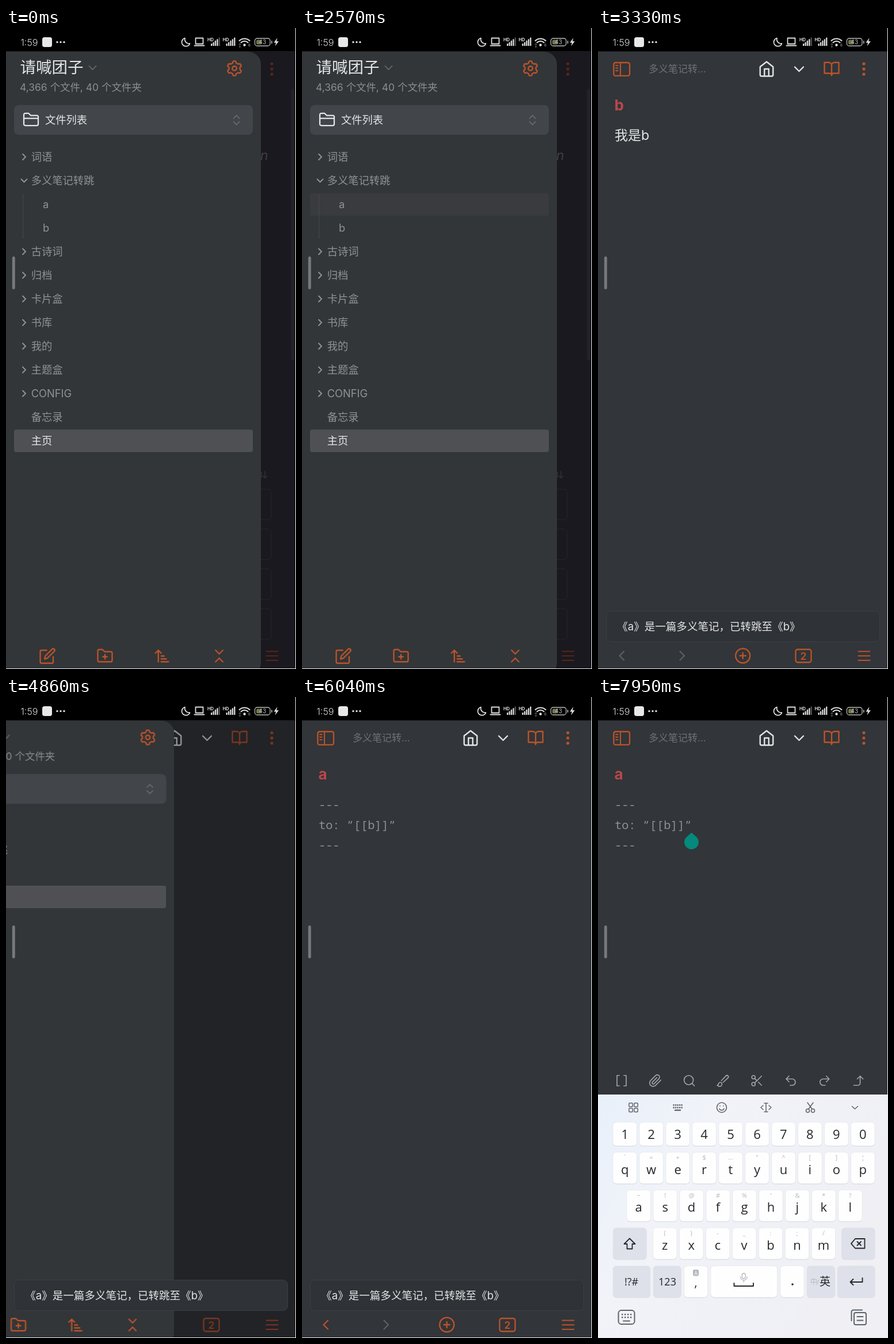
An HTML page that plays this animation: 504 px wide and 1111 px high, repeating every 8000 ms.

```html
<!DOCTYPE html>
<html lang="zh">
<head>
<meta charset="utf-8">
<title>笔记转跳</title>
<style>
html, body { margin: 0; width: 100%; height: 100%; overflow: hidden; background: #323539; }
svg { display: block; width: 100vw; height: 100vh; font-family: Inter, "Noto Sans CJK SC", "Noto Sans CJK", sans-serif; }
text { white-space: pre; }
.mono { font-family: "Noto Sans Mono", "DejaVu Sans Mono", monospace; }
.key { font-family: "Open Sans", "Noto Sans CJK SC", "Noto Sans CJK", sans-serif; text-anchor: middle; }
.mid { text-anchor: middle; }
</style>
</head>
<body>
<svg id="stage" viewBox="0 0 504 1111" preserveAspectRatio="none"></svg>
<script>
const LOOP = 8000;
const ORANGE = '#bb532a', WHITE = '#e4e5e6', GREY = '#909295', DIM = '#5d6064', PAGE = '#323539';

const box = (x, y, w, h, r, fill, more = '') =>
  `<rect x="${x}" y="${y}" width="${w}" height="${h}" rx="${r}" fill="${fill}" ${more}/>`;
const text = (x, y, size, str, fill, more = '') =>
  `<text x="${x}" y="${y}" font-size="${size}" fill="${fill}" ${more}>${str}</text>`;
const dot = (x, y, r, fill) => `<circle cx="${x}" cy="${y}" r="${r}" fill="${fill}"/>`;
const line = (d, color, w = 2, more = '') =>
  `<path d="${d}" fill="none" stroke="${color}" stroke-width="${w}" stroke-linecap="round" stroke-linejoin="round" ${more}/>`;
const icon = (cx, cy, size, d, color, w = 1.9) =>
  line(d, color, w, `transform="translate(${cx - size / 2} ${cy - size / 2}) scale(${size / 24})"`);
const group = (id, body) => `<g id="${id}">${body}</g>`;

const ring = (x, y, r) => `M${x + r} ${y}a${r} ${r} 0 1 1 ${-2 * r} 0 ${r} ${r} 0 0 1 ${2 * r} 0`;

function gearPath() {
  let d = '';
  for (let i = 0; i < 72; i++) {
    const a = i * Math.PI / 36;
    const r = 8.8 + Math.max(-1.1, Math.min(1.3, 2.4 * Math.cos(6 * a)));
    d += `${i ? 'L' : 'M'}${(12 + r * Math.sin(a)).toFixed(2)} ${(12 - r * Math.cos(a)).toFixed(2)}`;
  }
  return d + 'z' + ring(12, 12, 3);
}

const FOLDER = 'M4 20a2 2 0 0 1-2-2V5a2 2 0 0 1 2-2h4.5l3 3H20a2 2 0 0 1 2 2v10a2 2 0 0 1-2 2z';
const ICONS = {
  gear: gearPath(),
  edit: 'M11 4H4a2 2 0 0 0-2 2v14a2 2 0 0 0 2 2h14a2 2 0 0 0 2-2v-7M18.5 2.5a2.12 2.12 0 0 1 3 3L12 15l-4 1 1-4z',
  folder: FOLDER + 'M2 10h20',
  folderPlus: FOLDER + 'M12 10v6M9 13h6',
  sort: 'M3 8l4-4 4 4M7 4v16M11 12h4M11 16h7M11 20h10',
  collapse: 'M7 20l5-5 5 5M7 4l5 5 5-5',
  home: 'M3 9l9-7 9 7v11a2 2 0 0 1-2 2H5a2 2 0 0 1-2-2zM9 22V12h6v10',
  book: 'M2 3h6a4 4 0 0 1 4 4v14a3 3 0 0 0-3-3H2zM22 3h-6a4 4 0 0 0-4 4v14a3 3 0 0 1 3-3h7z',
  plus: ring(12, 12, 10) + 'M8 12h8M12 8v8',
  brackets: 'M8 3H4v18h4M16 3h4v18h-4',
  clip: 'M21.4 11l-9.2 9.2a6 6 0 0 1-8.5-8.5l8.6-8.6a4 4 0 1 1 5.7 5.7l-8.6 8.6a2 2 0 0 1-2.8-2.8l8-8',
  search: ring(11, 11, 8) + 'M21 21l-4.3-4.3',
  brush: 'M9 12l8-8.4a2.4 2.4 0 0 1 3.5 3.5L12 15M7 15c-1.7 0-3 1.3-3 3 0 1.3-2.5 1.5-2 2 1.1 1 2.5 2 4 2 2.2 0 4-1.8 4-4a3 3 0 0 0-3-3z',
  scissors: ring(6, 6, 3) + ring(6, 18, 3) + 'M20 4L8.1 15.9M14.5 14.5L20 20M8.1 8.1L12 12',
  undo: 'M9 14L4 9l5-5M4 9h10.5a5.5 5.5 0 0 1 0 11H11',
  redo: 'M15 14l5-5-5-5M20 9H9.5a5.5 5.5 0 0 0 0 11H13',
  up: 'M10 9l5-5 5 5M4 20h7a4 4 0 0 0 4-4V4'
};

function statusBar() {
  let s = box(0, 0, 504, 40.5, 0, '#000');
  s += text(25.5, 30.5, 16.2, '1:59', '#d8d8d8', 'font-weight="300"');
  s += box(63, 16, 17, 17, 4, '#e8e8e8');
  for (const x of [89, 95, 101]) s += dot(x, 24.5, 1.7, '#ddd');
  s += line('M311 17.5a7.2 7.2 0 1 0 8.5 9.5a7.5 7.5 0 0 1-8.5-9.5z', '#ddd', 1.8);
  s += line('M329.5 17.5h13v10h-13zM327.5 30.5h17', '#ddd', 1.8);
  for (const x of [350, 376.5]) {
    s += text(x, 23, 7.5, 'HD', '#ddd', 'font-weight="700"');
    for (let i = 0; i < 5; i++) {
      const h = 4 + i * 2.6;
      s += box(x + 6 + i * 3.4, 31 - h, 2.3, h, 0.6, x < 360 && i === 4 ? '#555' : '#ddd');
    }
  }
  s += line('M405.5 22a13 13 0 0 1 18 0M408.5 25.3a8.6 8.6 0 0 1 12 0', '#ddd', 2);
  s += dot(414.5, 29.5, 2.2, '#ddd') + text(421, 32, 6.5, '6', '#aaa') + text(404, 32, 6, '↕', '#aaa');
  s += box(432.5, 18, 26.5, 13, 4, 'none', 'stroke="#bbb" stroke-width="1.3"') + box(461, 22, 1.6, 5, 0.8, '#bbb');
  s += box(435, 20.5, 9, 8, 2, '#71784c') + text(445.8, 28.3, 10, '43', '#bbb', 'class="mid"');
  return s + '<path d="M471.5 17l-6 8.4h3.6l-1.4 6.2 6.2-8.6h-3.7z" fill="#ddd"/>';
}

function homePage() {
  let s = text(442, 229, 23, 'n', '#86888b', 'font-style="italic"');
  s += line('M444 770v9M450 768v12m-3.5-3.5l3.5 3.5 3.5-3.5', '#66696d', 1.5);
  for (let i = 0; i < 4; i++) s += box(14, 799.5 + i * 69, 447, 53, 6, 'none', 'stroke="#4a4d52"');
  return s + box(495, 106, 6, 470, 3, '#45484d');
}

function chrome() {
  let s = box(27.3, 60, 27.7, 22.8, 3, 'none', `stroke="${ORANGE}" stroke-width="2.3"`);
  s += line('M39 60v22.5M31 65h3.5M31 69.5h3.5M31 74h3.5', ORANGE, 2);
  s += text(88, 77, 17, '多义笔记转...', '#6f7275');
  s += icon(293, 71, 30, ICONS.home, WHITE) + line('M342 67.5l7.5 7.5 7.5-7.5', WHITE, 2.3);
  s += icon(406, 71, 30, ICONS.book, ORANGE);
  for (const y of [62, 71, 80]) s += dot(462, y, 2.6, ORANGE);
  s += line('M45 1080.5l-7.5 7.5 7.5 7.5', DIM, 2.2, 'id="back"');
  s += line('M142.5 1080.5l7.5 7.5-7.5 7.5', DIM, 2.2);
  s += icon(251.7, 1088, 30, ICONS.plus, ORANGE);
  s += box(343.5, 1077, 27, 22.5, 3.5, 'none', `stroke="${ORANGE}" stroke-width="2.3"`);
  s += text(357, 1094.5, 17.5, '2', ORANGE, 'class="mid" font-weight="600"');
  return s + line('M452.5 1080.5h20M452.5 1088.2h20M452.5 1096h20', ORANGE, 2.1);
}

const title = s => text(28.5, 143, 26, s, '#b9484a', 'font-weight="700"');
const pageA = () => title('a') + ['---', 'to: ”[[b]]”', '---']
  .map((s, i) => text(29, 194 + 35 * i, 20.3, s, '#8d8f91', 'class="mono"')).join('');
const pageB = () => title('b') + text(28.7, 193.7, 23.2, '我是b', WHITE);

const ROWS = ['词语', '多义笔记转跳', 'a', 'b', '古诗词', '归档', '卡片盒', '书库', '我的', '主题盒', 'CONFIG', '备忘录', '主页'];
const rowY = i => 223.5 + 41 * i;

function drawer() {
  let s = `<path d="M0 41H421a22 22 0 0 1 22 22V1100a22 22 0 0 1-22 22H0z" fill="#323639"/>`;
  s += text(24.5, 77.5, 27.5, '请喊团子', WHITE) + line('M144.5 66l6 6 6-6', DIM, 2);
  s += text(24, 108.5, 17.45, '4,366 个文件, 40 个文件夹', '#8c8e91');
  s += icon(397, 70, 30, ICONS.gear, ORANGE);
  s += box(14, 133.5, 415, 51.5, 8, '#424549') + icon(43.5, 159, 30, ICONS.folder, WHITE, 1.8);
  s += text(68, 165.5, 18.3, '文件列表', WHITE);
  s += line('M395.5 156.5l5-5 5 5M395.5 162.5l5 5 5-5', '#6b6e72', 1.7);
  s += box(14, 286.5, 415, 39, 4, '#393b3f', 'id="press"');
  s += box(29, 288, 1.2, 77, 0, '#43474b');
  s += box(14, rowY(0) - 19.5, 415, 39, 4, '#4e5054', 'id="active"');
  ROWS.forEach((name, i) => {
    const y = rowY(i), leaf = i === 2 || i === 3;
    if (i === 1) s += line(`M26.5 ${y - 2.5}l5 5 5-5`, GREY, 2);
    else if (!leaf && i < 11) s += line(`M29 ${y - 5}l5 5-5 5`, GREY, 2);
    s += text(leaf ? 64 : 43.7, y + 6.7, 18.3, name, GREY, `id="row${i}"`);
  });
  [['edit', 72], ['folderPlus', 172], ['sort', 271], ['collapse', 370.5]]
    .forEach(([name, x]) => s += icon(x, 1088.5, 30, ICONS[name], ORANGE));
  return s;
}

function toolbar() {
  let s = box(0, 641, 504, 48, 0, PAGE);
  ['brackets', 'clip', 'search', 'brush', 'scissors', 'undo', 'redo', 'up']
    .forEach((name, i) => s += icon(41 + i * 58.8, 665, 24, ICONS[name], '#a2a4a6', 1.7));
  return s;
}

function keyboard() {
  const INK = '#24262a', SOFT = '#5f636b', HINT = '#b4b7be', MOD = '#dee1ea';
  let s = box(0, 689, 504, 422, 0, 'url(#kb)');
  const cap = (x, y, w, h, fill = '#fefefe') =>
    box(x, y + 1, w, h, 6, '#d6d8e0') + box(x, y, w, h, 6, fill, 'stroke="#e2e4ea" stroke-width=".6"');
  const glyph = (x, y, size, str, fill = INK) => text(x, y, size, str, fill, 'class="key"');
  const row = (keys, hints, x0, y) => [...keys].forEach((k, i) => {
    const x = x0 + i * 45.95, hint = hints[i].replace('&', '&amp;');
    s += cap(x, y, 41.5, 54.5) + glyph(x + 20.7, y + 37.5, 22, k) + glyph(x + 20.7, y + 13, 11, hint, HINT);
  });
  // top strip
  for (const x of [57, 66]) for (const y of [707, 716])
    s += box(x - 3.2, y - 3.2, 6.4, 6.4, 1.5, 'none', `stroke="${SOFT}" stroke-width="1.5"`);
  for (let i = 0; i < 10; i++) s += box(130.5 + i % 5 * 3.5, i < 5 ? 706 : 710.5, 2.3, 2.5, 0, SOFT);
  s += box(133, 715, 11, 2.3, 0, SOFT);
  s += line(ring(215, 711.5, 8.5) + 'M211 713.5a4.3 4.3 0 0 0 8 0M212 708.5v.5M218 708.5v.5', SOFT, 1.6);
  s += line('M289 704h6M289 719h6M292 704v15M287 708l-4 3.5 4 3.5M297 708l4 3.5-4 3.5', SOFT, 1.5);
  s += line(ring(364.5, 717, 3) + ring(373.5, 717, 3) + 'M366 714l8-11M372 714l-8-11', SOFT, 1.5);
  s += line('M441.5 709.5l5 4.5 5-4.5', SOFT, 1.5);
  [...'1234567890'].forEach((k, i) => {
    const x = 26 + i * 45.95;
    s += cap(x, 737, 41.5, 41) + glyph(x + 20.7, 766, 22, k);
  });
  row('qwertyuiop', '`=+$…"^[]¦', 26, 789);
  row('asdfghjkl', "~!@#%'&*?", 50, 854.5);
  row('zxcvbnm', '()-_:;/', 95.5, 920);
  s += cap(26, 920, 58.5, 54.5, MOD) + line('M55 938.5l-9.5 9.5h5v8.5h9v-8.5h5z', INK, 1.8);
  s += cap(423, 920, 58.5, 54.5, MOD) + line('M447 939h16.5v16.5H447l-7-8.2zM450.5 944l6.5 6.5M457 944l-6.5 6.5', INK, 1.8);
  s += cap(26, 986, 65, 54.5, MOD) + glyph(58, 1020, 18, '!?#');
  s += cap(96, 986, 48.5, 54.5, MOD) + glyph(120.5, 1020, 18, '123');
  s += cap(149.5, 986, 41, 54.5) + glyph(170, 1022, 20, ',') + box(165, 992.5, 10, 11, 2, HINT) + glyph(170, 1001.5, 9, 'A', '#fff');
  s += cap(196, 986, 115.5, 54.5) + line('M236.5 1016v5h33.5v-5', INK, 1.9);
  s += box(250.3, 999, 6, 9, 3, 'none', `stroke="${HINT}" stroke-width="1.3"`) + line('M247.5 1005a5.8 5.8 0 0 0 11.6 0M253.3 1011v3', HINT, 1.3);
  s += cap(317, 986, 41, 54.5) + dot(338, 1018, 1.8, INK);
  s += cap(363, 986, 49, 54.5, MOD) + glyph(375, 1018, 12, '中', HINT) + glyph(382, 1019, 13, '/', HINT) + glyph(394.5, 1019.5, 19, '英');
  s += cap(416, 986, 65.5, 54.5, MOD) + line('M459.5 1007v7h-21M443.5 1009l-5 5 5 5', INK, 1.9);
  s += box(35.5, 1063, 28, 24, 5, 'none', `stroke="${SOFT}" stroke-width="2"`);
  for (let i = 0; i < 8; i++) s += box(41 + i % 4 * 5, i < 4 ? 1069 : 1074, 2.4, 2.4, 0, SOFT);
  s += line('M44 1081.5h11', SOFT, 2);
  s += box(445, 1067, 21, 21, 3, 'none', `stroke="${SOFT}" stroke-width="2"`);
  return s + line('M440.5 1081v-15a3.5 3.5 0 0 1 3.5-3.5h15M450.5 1074h10M450.5 1080.5h10', SOFT, 2);
}

const notice = () => box(14.5, 1010.5, 475, 53, 8, '#2f3236', 'stroke="#3c3f43"') +
  text(33.3, 1043.5, 18.55, '《a》是一篇多义笔记，已转跳至《b》', WHITE);

const stage = document.getElementById('stage');
stage.innerHTML =
  `<defs><linearGradient id="kb" x2="1" y2=".5"><stop stop-color="#e8f0fa"/><stop offset=".35" stop-color="#f1f3f9"/>
  <stop offset="1" stop-color="#efeff4"/></linearGradient></defs>` +
  box(0, 0, 504, 1111, 0, PAGE) +
  group('home', homePage()) + group('noteB', pageB()) + group('noteA', pageA()) + chrome() +
  box(162.2, 211, 1.7, 24, 0, '#d0572b', 'id="caret"') +
  '<path id="grip" d="M162.5 235l8.8 7.7a12.45 12.45 0 1 1-17.6 0z" fill="#04897c"/>' +
  box(0, 41, 504, 1070, 0, 'rgba(8,3,10,.55)', 'id="shade"') +
  group('drawer', drawer()) +
  box(0, 689, 504, 422, 0, '#fafafa', 'id="blank"') +
  group('tools', toolbar()) + group('keys', keyboard()) + group('notice', notice()) +
  box(10.8, 396, 4.9, 57, 2.4, '#77797c') + statusBar() +
  box(503, 0, 1, 1111, 0, '#eee') + box(0, 1110, 504, 1, 0, '#eee');

// points: [ms, value, easing to the next point]; without easing the value holds
const HOLD = 'steps(1, end)', OUT = 'cubic-bezier(.2,.7,.3,1)';
function track(id, prop, points) {
  const all = [...points, [LOOP, points[points.length - 1][1]]];
  document.getElementById(id).animate(
    all.map(([ms, value, easing = HOLD]) => ({ offset: ms / LOOP, [prop]: value, easing })),
    { duration: LOOP, iterations: Infinity });
}
const show = (id, from, to = LOOP) =>
  track(id, 'opacity', [[0, from ? 0 : 1], ...(from ? [[from, 1]] : []), ...(to < LOOP ? [[to, 0]] : [])]);
const shift = (x, y = 0) => `translate(${x}px, ${y}px)`;

const OPEN_B = 2730, OPEN_A = 5690, TYPE = 6980;

track('drawer', 'transform', [
  [0, shift(0)], [2660, shift(0), OUT], [2980, shift(-445)],
  [4820, shift(-445), OUT], [4990, shift(0)], [OPEN_A, shift(0), OUT], [5990, shift(-445)]]);
track('shade', 'opacity', [
  [0, 1], [2660, 1, OUT], [2980, 0], [4820, 0, OUT], [4990, 1], [OPEN_A, 1, OUT], [5990, 0]]);
track('press', 'opacity', [[0, 0], [2565, 1], [2800, 0], [5615, 1], [5760, 0]]);

const LIT = '#e8e8e9';
track('active', 'transform', [[0, shift(0, 41 * 12)], [OPEN_B, shift(0, 41 * 3)], [OPEN_A, shift(0, 41 * 2)]]);
track('row12', 'fill', [[0, LIT], [OPEN_B, GREY]]);
track('row3', 'fill', [[0, GREY], [OPEN_B, LIT], [OPEN_A, GREY]]);
track('row2', 'fill', [[0, GREY], [OPEN_A, LIT]]);

show('home', 0, OPEN_B);
show('noteB', OPEN_B, OPEN_A);
show('noteA', OPEN_A);
track('back', 'stroke', [[0, DIM], [OPEN_A, ORANGE]]);
track('notice', 'opacity', [[0, 0], [3120, 0, 'ease-out'], [3320, 1], [TYPE, 0]]);

show('caret', 6840, 7540);
track('grip', 'opacity', [[0, 0], [TYPE, 0, 'linear'], [7050, 0.35, 'linear'], [7190, 1]]);
show('blank', TYPE);
show('tools', 7260);
track('keys', 'transform', [[0, shift(0, 430)], [7115, shift(0, 430), OUT], [7390, shift(0)]]);
</script>
</body>
</html>
```
